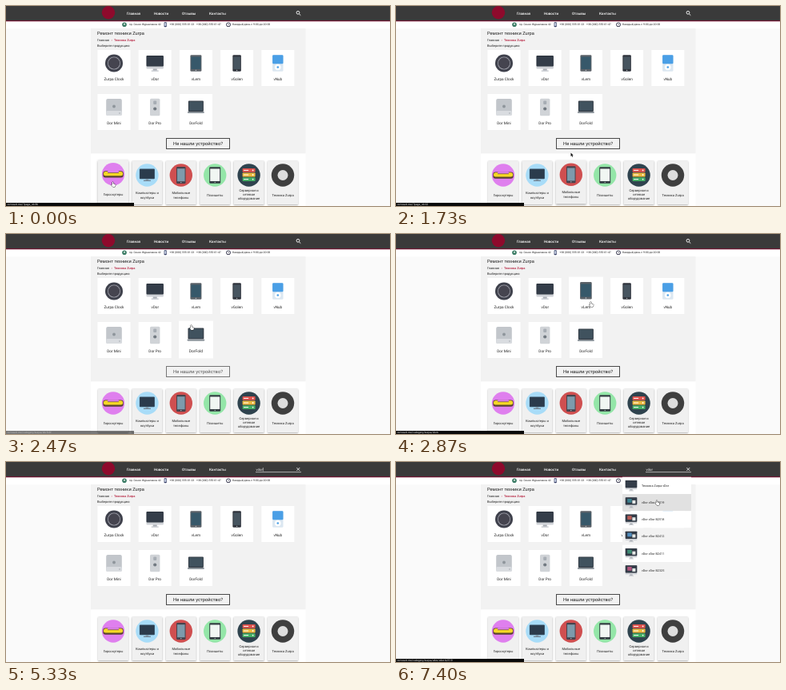
Write an HTML page with a canvas that moves like this. It is 480 px wide and 250 px high and loops after 7.47 s.

```html
<!DOCTYPE html>
<html lang="ru">
<head>
<meta charset="utf-8">
<style>
html, body { margin: 0; width: 100%; height: 100%; overflow: hidden; background: #fafafa; }
canvas { display: block; }
</style>
</head>
<body>
<canvas id="stage" width="480" height="250"></canvas>
<script>
const ctx = document.getElementById('stage').getContext('2d');
const LOOP = 7470;
ctx.textRendering = 'geometricPrecision';

const clamp = v => Math.max(0, Math.min(1, v));
const ramp = (t, start, length) => clamp((t - start) / length);

function box(x, y, w, h, color, r = 0) {
  ctx.fillStyle = color;
  ctx.beginPath();
  ctx.roundRect(x, y, w, h, r);
  ctx.fill();
}
function disc(x, y, r, color) {
  ctx.fillStyle = color;
  ctx.beginPath();
  ctx.arc(x, y, r, 0, 7);
  ctx.fill();
}
function line(color, width, ...p) {
  ctx.strokeStyle = color;
  ctx.lineWidth = width;
  ctx.beginPath();
  for (let i = 0; i < p.length; i += 2) ctx.lineTo(p[i], p[i + 1]);
  ctx.stroke();
}
function text(s, x, y, size, color = '#222', weight = 400, align = 'left') {
  ctx.font = `${weight} ${size}px Roboto, sans-serif`;
  ctx.fillStyle = color;
  ctx.textAlign = align;
  ctx.textBaseline = 'middle';
  ctx.fillText(s, x, y);
}
function at(x, y, scale, draw) {
  ctx.save();
  ctx.translate(x, y);
  ctx.scale(scale, scale);
  draw();
  ctx.restore();
}

// Icons are drawn around their own centre.
function monitor(screen = '#343d49') {
  box(-10.7, -9.5, 21.4, 16.5, '#cfd2d7', 1);
  box(-10.7, -9.5, 21.4, 13.6, '#2b323c', 1);
  box(-9.8, -8.6, 19.6, 12, screen);
  box(-2.5, 7, 5, 2.2, '#a9adb3');
  box(-4.5, 9, 9, 1.3, '#c3c7cc');
}
function slab(w, h, frame, screen) {
  box(-w / 2, -h / 2, w, h, frame, 1.3);
  box(-w / 2 + 1, -h / 2 + 2.2, w - 2, h - 5, screen);
  disc(0, h / 2 - 1.4, .7, '#c9ced2');
}
function laptop() {
  box(-9.5, -8, 19, 13.5, '#333b44', 1);
  box(-8.5, -7, 17, 11.3, '#40525e');
  box(-10.5, 5.5, 21, 2, '#8c949b', 1);
}
function watch() {
  disc(0, 0, 11, '#3f414c');
  disc(0, 0, 8, '#a3a4ae');
  disc(0, 0, 7.2, '#45444f');
}
function player() {
  box(-6.7, -10.3, 13.4, 20.6, '#dbe7f1', 1.3);
  box(-6.7, -10.3, 13.4, 11, '#4a9fe6', 1.3);
  disc(0, 5, 3.8, '#fff');
  disc(0, 5, 1.3, '#4a9fe6');
}
function miniBox() {
  box(-9.8, -10.5, 19.6, 21, '#c2c6cb', 2);
  box(-9.8, 4.5, 19.6, 6, '#d9dce0', 1.5);
  disc(0, -1, 1.9, '#8e959b');
  disc(7, 7.5, .7, '#9aa0a6');
}
function tower() {
  box(-6.2, -10.7, 12.4, 21.4, '#d0d3d7', 1.5);
  box(-2, -8, 4, 4.5, '#a7adb4', 1);
  disc(0, 2, 2.1, '#727a82');
}
function hoverboard() {
  box(-12.7, -4, 25.4, 8.2, '#5a4432', 3);
  box(-12, -3.3, 24, 5.2, '#f6d825', 2.5);
  box(-7, -4.2, 14, 2.4, '#df7fee', 1);
  line('#5a4432', .6, -7, -1.8, 7, -1.8);
}
function computer() {
  box(-9.5, -8, 19, 12.7, '#33475a', 1);
  box(-8.6, -7.1, 17.2, 10.6, '#2b3b4c');
  box(-1.8, 4.7, 3.6, 1.6, '#8394a3');
  box(-4.5, 6.2, 9, 1.3, '#6f8191');
}
function servers() {
  ['#e0524c', '#ecb93e', '#43ad64'].forEach((c, i) => {
    box(-8, -8.5 + i * 5.6, 16, 4.8, c, .7);
    box(-6.5, -6.6 + i * 5.6, 6, 1, '#fff');
    disc(5, -6.1 + i * 5.6, .9, '#fff');
  });
}

const products = [
  ['Zurpa Clock', watch], ['vDor', monitor],
  ['vLem', () => slab(14, 20.5, '#5b6168', '#36586a')],
  ['vGolen', () => slab(10.5, 20.5, '#2f333b', '#46545f')], ['vNub', player],
  ['Dor Mini', miniBox], ['Dor Pro', tower], ['DorFold', laptop]
].map(([name, icon], i) => ({ name, icon, x: 114.5 + i % 5 * 51.2, y: i < 5 ? 55 : 110, w: 41, h: 45 }));

const services = [
  ['Гироскутеры', '#df7fee', hoverboard],
  ['Компьютеры и|ноутбуки', '#a8dcf8', computer],
  ['Мобильные|телефоны', '#cf4f50', () => slab(11.5, 21, '#47434d', '#7d9bac')],
  ['Планшеты', '#94e6a8', () => slab(14, 20.5, '#333c42', '#f1f6f3')],
  ['Серверное и|сетевое|оборудование', '#2f434e', servers],
  ['Техника Zurpa', '#3f3f3f', () => disc(0, 0, 6.5, '#dedede')]
].map(([label, color, icon], i) => ({ lines: label.split('|'), color, icon, x: 115 + i * 42.4, y: 193.5, w: 38, h: 54.5 }));

// Pointer path: time, x, y
const path = [
  [0, 133, 220], [200, 134, 221], [930, 134, 221], [1250, 180, 222],
  [1580, 217, 208], [1730, 218.5, 183.5], [2050, 223, 172], [2250, 228, 150], [2470, 231, 114],
  [2600, 234, 104], [2870, 243, 85], [3000, 247, 78], [3330, 386, 12], [3600, 366, 8.5], [4600, 366, 8.5],
  [6070, 352, 9], [6330, 337, 4], [6670, 337, 7], [7050, 328, 38], [7400, 325.5, 48], [LOOP, 325.5, 48]
];
function pointer(t) {
  const i = Math.max(1, path.findIndex(p => p[0] > t));
  const [t0, x0, y0] = path[i - 1], [t1, x1, y1] = path[i];
  const u = clamp((t - t0) / (t1 - t0)), k = u * u * (3 - 2 * u);
  return [x0 + (x1 - x0) * k, y0 + (y1 - y0) * k];
}
const inside = ([x, y], c) => x > c.x && x < c.x + c.w && y > c.y && y < c.y + c.h;

// Hover transition: share of the last moments spent over the card.
function hover(t, card) {
  let sum = 0;
  for (let i = 0; i < 8; i++) sum += inside(pointer(Math.max(0, t - i * 25)), card);
  return sum / 8;
}

function drawHeader(t) {
  box(0, 0, 480, 18, '#3a3a3a');
  box(0, 18, 480, 1.3, '#6f1733');
  disc(128, 8.3, 8.2, '#8e0a2c');
  [['Главная', 151], ['Новости', 185], ['Отзывы', 220], ['Контакты', 254]]
    .forEach(([s, x]) => text(s, x, 9.6, 4.5, '#fff', 500));
  const open = 1 - (1 - ramp(t, 3900, 700)) ** 3;
  ctx.globalAlpha = 1 - open;
  ctx.strokeStyle = '#fff';
  ctx.lineWidth = .9;
  ctx.beginPath();
  ctx.arc(365, 8.3, 1.9, 0, 7);
  ctx.stroke();
  line('#fff', 1, 366.4, 9.8, 368.3, 11.7);
  ctx.globalAlpha = 1;
  if (!open) return;
  line('#ddd', .7, 369 - 57 * open, 12.6, 369, 12.6);
  if (t < 4800) return;
  line('#fff', .8, 363.3, 7, 367.3, 11);
  line('#fff', .8, 367.3, 7, 363.3, 11);
  const typed = t < 5000 ? '' : t < 5130 ? 'vd' : t < 5330 ? 'vdo' : 'vdor';
  text(typed, 312.5, 9.3, 4.3, '#fff');
  const end = 313 + ctx.measureText(typed).width;
  if (t < 5255 || Math.floor((t - 5255) / 537) % 2 === 0) line('#fff', .5, end, 7, end, 11.5);
}

function drawContacts() {
  box(0, 19.2, 480, 9, '#fff');
  disc(148, 23.3, 2.8, '#3b7c65');
  disc(148, 22.8, 1, '#e4efe9');
  text('пр. Синих Журавликов 42', 154, 23.4, 3.3);
  box(197.6, 20.3, 3.2, 6, '#3a4068', .7);
  box(198.2, 21.2, 2, 3.7, '#c5d0e3');
  text('+38 (000) 555-01-23', 204.5, 23.4, 3.4);
  text('+38 (000) 555-01-47', 238, 23.4, 3.4);
  disc(278, 23.3, 2.8, '#34344c');
  disc(278, 23.3, 2, '#fff');
  line('#34344c', .5, 278, 21.8, 278, 23.4, 279.2, 23.4);
  text('Каждый день с 9:00 до 20:00', 283, 23.4, 3.5);
}

function drawProduct(t, p) {
  const k = hover(t, p);
  at(p.x + 20.5, p.y + 22.5 - k * .4, 1 + k * .045, () => {
    box(-20.5, -22.5, 41, 45, '#fff');
    at(0, -6, 1, () => p.icon());
    text(p.name, 0, 14.2, 4.7, '#222', 400, 'center');
  });
}

function drawService(t, s) {
  const k = hover(t, s);
  at(s.x + 19, s.y - k * 1.2, 1, () => {
    ctx.shadowColor = 'rgba(0,0,0,.35)';
    ctx.shadowBlur = 2 + k;
    ctx.shadowOffsetY = .8 + .7 * k;
    box(-19, 0, 38, s.h, '#f0f0f0', .6);
    ctx.shadowColor = 'transparent';
    disc(0, 18, 14.2, s.color);
    at(0, 18, 1, s.icon);
    const n = s.lines.length, mid = n === 3 ? 42.2 : 43.2;
    s.lines.forEach((l, j) => text(l, 0, mid + (j - (n - 1) / 2) * (n === 3 ? 4.9 : 5.4), 4.1, '#222', 400, 'center'));
  });
}

function drawPage(t) {
  box(0, 0, 480, 250, '#fafafa');
  drawContacts();
  box(106, 28, 268.5, 156.5, '#f2f2f2');
  box(106, 184.5, 268.5, 65.5, '#fff');
  text('Ремонт техники Zurpa', 114, 34.7, 5.7);
  text('Главная', 114, 43.1, 3.95);
  text('›', 131.5, 42.8, 4.2, '#b51f3d');
  text('Техника Zurpa', 135, 43.1, 3.95, '#b51f3d', 500);
  text('Выберите продукцию', 114, 50.2, 4);
  products.forEach(p => drawProduct(t, p));
  const soft = t > 1930 && t < 2560;
  ctx.strokeStyle = soft ? '#777' : '#4a4a4a';
  ctx.lineWidth = 1;
  ctx.strokeRect(200.5, 165.5, 79, 13);
  text('Не нашли устройство?', 240, 171.9, 5.85, soft ? '#555' : '#1a1a1a', 400, 'center');
  services.forEach(s => drawService(t, s));
}

const models = ['B2519', 'B2518', 'B2412', 'B2411', 'B2325'];
const wallpapers = ['#3c8290', '#b95c56', '#4f8cbd', '#3e8d75', '#b1567e'];
const resultBox = i => ({ x: 283, y: 18.8 + i * 21.25, w: 86, h: 21.25 });

function drawResults(t) {
  ctx.globalAlpha = ramp(t, 6040, 230);
  for (let i = 0; i < 6; i++) {
    const r = resultBox(i), mid = r.y + 10.6;
    box(r.x, r.y, r.w, r.h, i % 2 ? '#f2f2f2' : '#fff');
    box(r.x, r.y, r.w, r.h, `rgba(0,0,0,${.07 * hover(t, r)})`);
    at(294, mid, .68, () => {
      monitor();
      if (!i) return;
      box(-7, -7, 8, 7, wallpapers[i - 1], 1);
      box(2, -4, 6, 6, '#e5e8e6');
    });
    text(i ? 'vDor vDor ' + models[i - 1] : 'Техника Zurpa vDor', 307, mid, 3.8);
  }
  ctx.globalAlpha = 1;
}

// Link preview: address, shown from, shown until
const links = [
  ['?page_id=86', -200, 1080], ['?page_id=64', 930, 1420], ['?page_id=62', 1270, 1900],
  ['category/zurpa/dorfold', 2390, 2680], ['category/zurpa/vlem', 2530, 3150],
  ['category/zurpa/vdor/vdor-b2519', 6960, 9000]
];
function drawLink(t) {
  const i = links.findLastIndex(l => t >= l[1]);
  const [address, from, until] = links[i];
  if (t > until) return;
  const joined = i > 0 && links[i - 1][2] > from;
  ctx.globalAlpha = Math.min(joined ? 1 : ramp(t, from, 150), ramp(until - t, 0, 120));
  box(0, 246, 160, 4, '#080808');
  text('remount.me/' + address, 1.5, 248.2, 3.4, '#eee');
  ctx.globalAlpha = 1;
}

function drawPointer(t) {
  if (t > 4600 && t < 6070) return;
  const pos = pointer(t), targets = [...products, ...services];
  if (t > 6400) targets.push(...[0, 1, 2].map(resultBox));
  const hand = targets.some(c => inside(pos, c));
  const shape = hand
    ? 'M0 0Q.9-.6 1.1.5V2.2L3.3 2.7Q4 3 3.8 4L3.3 6H.5L-1.4 3.6Q-1.3 2.8-.2 3.4Z'
    : 'M0 0V4.4L1 3.5 1.8 5.2 2.6 4.8 1.9 3.1H3.2Z';
  at(...pos, 1, () => {
    const p = new Path2D(shape);
    ctx.lineWidth = .8;
    ctx.strokeStyle = hand ? '#111' : '#fff';
    ctx.stroke(p);
    ctx.fillStyle = hand ? '#fff' : '#111';
    ctx.fill(p);
  });
}

function frame() {
  const t = performance.now() % LOOP;
  drawPage(t);
  drawHeader(t);
  if (t > 6040) drawResults(t);
  drawLink(t);
  drawPointer(t);
  requestAnimationFrame(frame);
}
frame();
</script>
</body>
</html>
```
